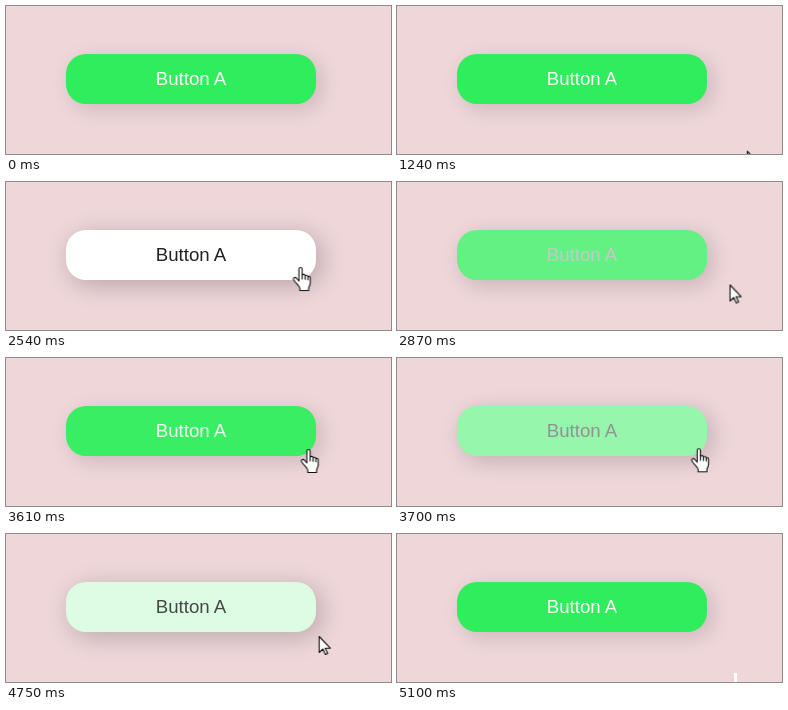
Animation, 385 px wide and 148 px high, one loop 5510 ms. Source, as an HTML page:

```html
<!DOCTYPE html>
<html lang="en">
<head>
<meta charset="utf-8">
<title>Button hover</title>
<style>
  :root { --loop: 5510ms; }
  html, body { margin: 0; width: 100%; height: 100%; overflow: hidden; background: #eed6d9; }

  .button {
    position: absolute; left: 60px; top: 48px; width: 250px; height: 50px;
    border-radius: 20px;
    font: 18.67px/50px Arial, "Liberation Sans", sans-serif;
    text-align: center;
    animation: hover var(--loop) infinite;
  }
  /* Each hover change is a 400 ms ease. */
  @keyframes hover {
    0%, 27.13%, 56.08%, 65.06%, 92.47%, 100% {
      background: #2fed5b; color: #fff;
      box-shadow: 5px 5px 20px rgba(0, 0, 0, .14);
      animation-timing-function: ease;
    }
    34.39%, 48.82%, 72.32%, 85.21% {
      background: #fff; color: #222;
      box-shadow: 5px 5px 25px rgba(0, 0, 0, .23);
      animation-timing-function: ease;
    }
  }

  svg { position: absolute; left: 0; top: 0; width: 385px; height: 148px; overflow: hidden; }
  .cursor { animation: move var(--loop) infinite linear; }
  .hand { animation: hand var(--loop) infinite step-end; }
  .arrow { animation: arrow var(--loop) infinite step-end; }
  .trace { animation: trace var(--loop) infinite step-end; }

  @keyframes move {
    0%, 22.49% { transform: translate(350px, 160px); }
    22.5%  { transform: translate(350px, 145px); }
    27.13% { transform: translate(306px, 94px); animation-timing-function: ease-out; }
    30.13% { transform: translate(295px, 86px); }
    33.58%, 46.1% { transform: translate(294px, 85px); animation-timing-function: ease-in; }
    48.82% { transform: translate(309px, 92px); animation-timing-function: ease-out; }
    53.5%, 61.34% { transform: translate(336px, 104px); animation-timing-function: ease-in-out; }
    65.06% { transform: translate(304px, 92px); }
    65.52% { transform: translate(302px, 91px); animation-timing-function: ease-out; }
    72.2%, 82.94% { transform: translate(300px, 89px); animation-timing-function: ease-in; }
    85.21% { transform: translate(308px, 95px); }
    91.5%  { transform: translate(337px, 138px); }
    92.56%, 100% { transform: translate(340px, 160px); }
  }
  @keyframes hand {
    0%, 48.82%, 85.21%, 100% { opacity: 0; }
    27.13%, 65.06% { opacity: 1; }
  }
  @keyframes arrow {
    0%, 27.13%, 65.06%, 92.56%, 100% { opacity: 0; }
    22.5%, 48.82%, 85.21% { opacity: 1; }
  }
  @keyframes trace {
    0% { opacity: 0; }
    92.56%, 100% { opacity: 1; }
  }
</style>
</head>
<body>
<div class="button">Button A</div>
<svg viewBox="0 0 385 148" aria-hidden="true">
  <path class="trace" d="M337 139h3v9h-3z" fill="#fff"/>
  <g class="cursor" fill="#fff" stroke="#111" stroke-width="1.1" stroke-linejoin="round" stroke-linecap="round">
    <path class="arrow" d="M.5.5V16.5L4.2 13 6.7 18.6 9 17.6 6.5 12.2H11.6Z"/>
    <g class="hand" transform="translate(-7.5 0)">
      <path d="M6.4 14V2.1a1.6 1.6 0 0 1 3.2 0V8c.6-1 2.8-.8 3 .7.7-.9 2.6-.5 2.8.9.8-.6 2.3 0 2.3 1.5V16c0 2.4-1.6 3.6-1.6 5.2V23.5H7.3V21.3C7.3 19.4 3.5 16.4 1.3 13 0 10.8 2.5 9.6 4 11.2Z"/>
      <path d="M9.6 8v4M12.6 8.7v3.6M15.4 9.6v3.2" fill="none"/>
    </g>
  </g>
</svg>
</body>
</html>
```
